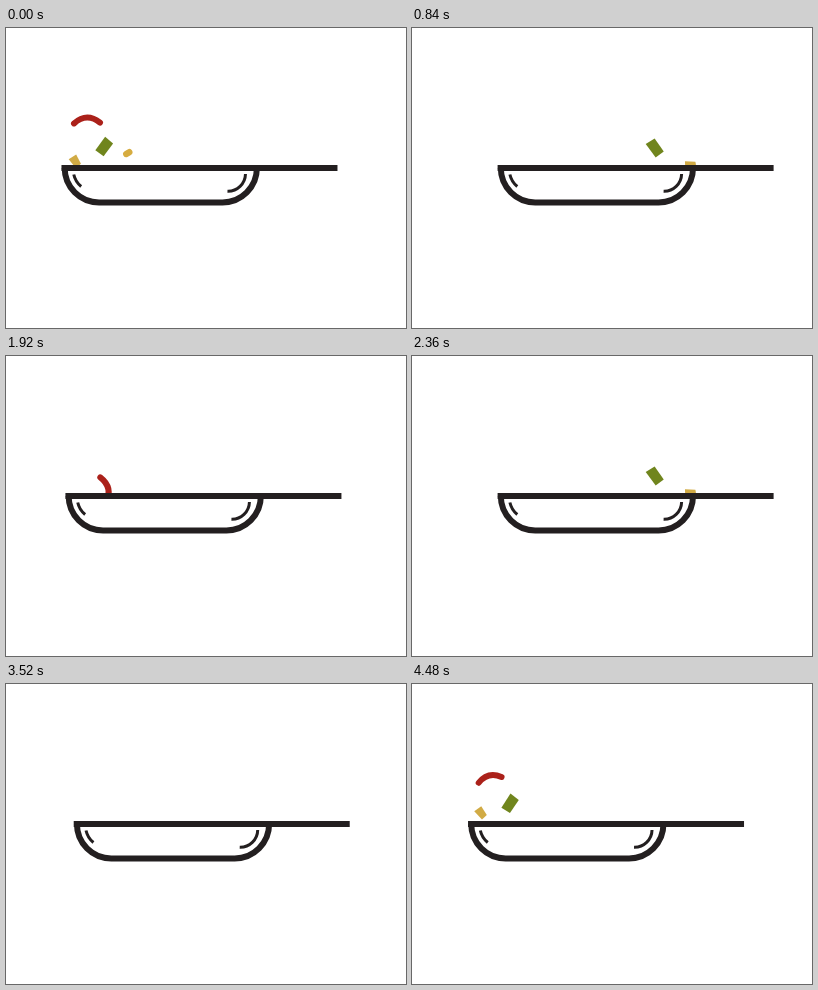
Write an HTML page that moves like this. It is 400 px wide and 300 px high and loops after 4.52 s.

```html
<!DOCTYPE html>
<html lang="en">
<head>
<meta charset="utf-8">
<title>Tossing pan</title>
<style>
  html, body { margin: 0; width: 100%; height: 100%; overflow: hidden; background: #fff; }
  svg { display: block; width: 100vw; height: 100vh; }
</style>
</head>
<body>
<svg viewBox="0 0 400 300">
  <path id="chili" fill="none" stroke="#ab211a" stroke-width="6" stroke-linecap="round"/>
  <path id="pepper" fill="#70851d" d="M.5-9.8 8.7-3.3-.3 9.7-8.8 4.2Z"/>
  <path id="cube" fill="#d1ab45" d="M.7-7 6 2 1 6.5-6.5-2Z"/>
  <path id="corn" fill="none" stroke="#d6ac40" stroke-width="6.4" stroke-linecap="round" d="M-1.5 .9 1.5-.9"/>
  <g id="pan" fill="none" stroke="#231f20">
    <path fill="#fff" stroke-width="6" d="M3.2 140A34.4 34.4 0 0 0 37.600 174.400H161A34.4 34.4 0 0 0 195.400 140"/>
    <path stroke-width="6" d="M0 140H276"/>
    <path stroke-width="3" d="M12.300 146.500A21 21 0 0 0 19.700 158.500M184 146A17.500 17.500 0 0 1 166 163.200"/>
  </g>
</svg>
<script>
const LOOP = 4520, CYCLE = 1520;
const LEFT_PULL = 2.7e-4, RIGHT_PULL = 6.2e-4;
const el = id => document.getElementById(id);
const chili = el('chili'), pepper = el('pepper'), cube = el('cube'), corn = el('corn'), pan = el('pan');
const clamp01 = v => Math.min(1, Math.max(0, v));

// A cosine swing flattened by tanh, so the pan lingers at both ends.
function panX(phase) {
  const swing = Math.cos((phase - 132) / CYCLE * 2 * Math.PI) + 0.03;
  return 70.4 - 15.4 * Math.tanh(1.7 * swing) / Math.tanh(1.7);
}

const toss = (t, peakTime, peakY, pull) => peakY + pull * (t - peakTime) ** 2;

// Food that has sunk into the pan is hidden.
function place(node, x, y, turn, scale = 1) {
  const visible = y < 148 && scale > 0;
  node.setAttribute('visibility', visible ? 'visible' : 'hidden');
  node.setAttribute('transform', `translate(${x} ${y}) rotate(${turn}) scale(${scale})`);
}

function tossRight(t) {
  const since = t - 840;
  place(pepper, 242.7 + 0.05 * since, toss(t, 795, 118.5, RIGHT_PULL), -70 + 0.1 * since);
  place(cube, 278.5, toss(t, 690, 123.5, RIGHT_PULL), -58 + 0.2 * since);
  for (const node of [chili, corn]) node.setAttribute('visibility', 'hidden');
}

function tossLeft(t, x) {
  // "curl" falls from 1 to 0 as the food unfolds at the top of its flight.
  const curl = clamp01((CYCLE - t) / 80) ** 1.75;
  const after = Math.max(0, t - CYCLE);
  const size = 1 - 0.33 * curl, half = 13 * size;
  chili.setAttribute('d', `M${-half} 0Q0 ${-11 * size * size} ${half} 0`);

  place(chili, x + 25.5 - 12 * curl + 0.03 * after, toss(t, 1540, 94.9, LEFT_PULL), -2 - 43 * curl + 0.2 * after);
  place(pepper, x + 42.8 - 2.5 * curl, toss(t, 1540, 118.4, LEFT_PULL), 2 - 10 * curl + 0.1 * after);
  place(cube, x + 13.6 - 3 * curl, toss(t, 1300, 120.3, LEFT_PULL), 3 - 17 * curl + 0.1 * after);
  place(corn, x + 66.3, toss(t, 1540, 125, LEFT_PULL), 0.1 * after, clamp01((t - 1490) / 25));
}

function draw(time) {
  const t = time % LOOP;
  // The last cycle runs slightly ahead so that three cycles close the loop.
  const phase = (t + 40 * clamp01((t - 3000) / 1400)) % CYCLE;
  const x = panX(phase);
  pan.setAttribute('transform', `translate(${x} 0)`);
  if (phase > 500 && phase < 1010) tossRight(phase);
  else tossLeft(phase < 1010 ? phase + CYCLE : phase, x);
}

const start = performance.now();
function tick() {
  draw(performance.now() - start);
  requestAnimationFrame(tick);
}
tick();
</script>
</body>
</html>
```
